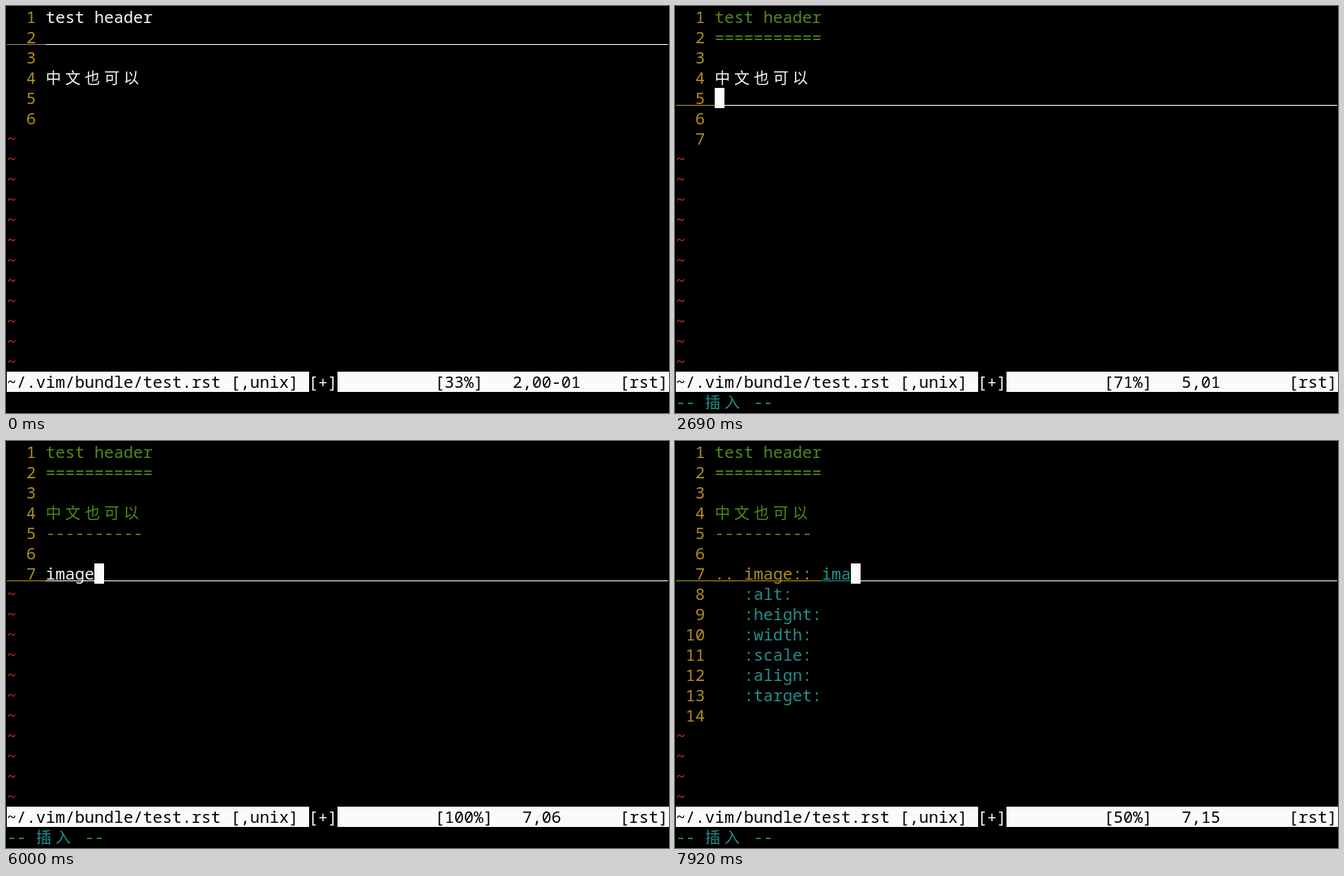
Write an HTML page that moves like this. It is 818 px wide and 502 px high and loops after 8000 ms.

```html
<!DOCTYPE html>
<html lang="zh">
<head>
<meta charset="utf-8">
<title>Editing test.rst</title>
<style>
  html, body { margin: 0; width: 100%; height: 100%; overflow: hidden; background: #000; }
  svg { display: block; }
  text { font: 20px "Noto Sans Mono", "DejaVu Sans Mono", monospace; white-space: pre; }
  .wide { font: 19px "Noto Sans CJK SC", "Noto Sans CJK", sans-serif; letter-spacing: 5px; }
</style>
</head>
<body>
<svg id="terminal" width="818" height="502" viewBox="0 0 818 502"></svg>
<script>
(() => {
  const LOOP = 8000, CELL = 12, ROW = 25, TEXT_COL = 4, ROWS = 18;
  const WHITE = '#fafafa', OCHRE = '#b18d1e', GREEN = '#4e8a1c', TEAL = '#23908e', RED = '#bd2c1e';
  const FIELDS = ['alt', 'height', 'width', 'scale', 'align', 'target'];
  const TITLE = 'test header', SUBTITLE = '中文也可以';
  const TRIGGER = 'image', DIRECTIVE = '.. image:: ', PATH = 'ima';
  const NEW_LINE = 2530;

  // Each step: time, cursor row, characters typed in that row, mode, extras.
  const steps = [];
  const step = (time, row, typed, mode = 'normal', extra = {}) =>
    steps.push({ time, row, typed, mode, ...extra });
  const type = (start, gap, count, row, base = 0, extra = {}) => {
    for (let i = 0; i < count; i++) step(start + i * gap, row, base + i + 1, 'insert', extra);
  };

  step(0, 2, 0, 'normal', { hidden: true });
  step(70, 2, 0);
  step(380, 2, 0, 'insert');
  type(840, 80, TITLE.length, 2);
  step(1760, 2, TITLE.length);
  step(1990, 3, 0);
  step(2220, 4, 0);
  step(NEW_LINE, 5, 0, 'insert');
  type(3610, 55, SUBTITLE.length * 2, 5);
  step(4610, 5, SUBTITLE.length * 2);
  step(4920, 6, 0);
  step(5150, 7, 0);
  step(5460, 7, 0, 'insert');
  type(5600, 80, TRIGGER.length, 7);
  step(6230, 7, DIRECTIVE.length, 'insert', { expanded: true });
  type(7460, 190, PATH.length, 7, DIRECTIVE.length, { expanded: true });

  const terminal = document.getElementById('terminal');
  const cellX = col => 1 + col * CELL;
  const rowY = row => 1 + (row - 1) * ROW;
  const isWide = text => /[\u4e00-\u9fff]/.test(text);
  const cells = text => isWide(text) ? text.length * 2 : text.length;
  const rect = (x, y, width, height, fill) =>
    `<rect x="${x}" y="${y}" width="${width}" height="${height}" fill="${fill}"/>`;
  const print = (row, col, text, fill) =>
    `<text x="${cellX(col)}" y="${rowY(row) + 20}" fill="${fill}"${isWide(text) ? ' class="wide"' : ''}>${text}</text>`;

  // Lines of the buffer, each a list of [text, colour] runs.
  function buffer({ time, row, typed, expanded }) {
    const heading = (text, mark, underlineRow) => {
      const count = row === underlineRow ? typed : row > underlineRow ? cells(text) : 0;
      const color = count > 1 ? GREEN : WHITE;
      return [[[text, color]], [[mark.repeat(count), color]]];
    };
    const lines = [...heading(TITLE, '=', 2), [], ...heading(SUBTITLE, '-', 5), []];
    if (expanded) {
      lines.push([[DIRECTIVE, OCHRE], [PATH.slice(0, typed - DIRECTIVE.length), TEAL]]);
      for (const field of FIELDS) lines.push([[`   :${field}:`, TEAL]]);
      lines.push([]);
    } else if (time >= NEW_LINE) {
      lines.push([[row === 7 ? TRIGGER.slice(0, typed) : '', WHITE]]);
    }
    return lines;
  }

  function statusBar({ row, typed, mode }, total, empty) {
    const bar = ROWS + 1;
    const pad = n => String(n).padStart(2, '0');
    const percent = `[${Math.floor(row * 100 / total)}%]`;
    const column = mode === 'insert' ? pad(typed + 1) : empty ? '00-01' : pad(Math.max(typed, 1));
    return rect(1, rowY(bar), 373, ROW, WHITE) + rect(409, rowY(bar), 409, ROW, WHITE)
      + print(bar, 0, '~/.vim/bundle/test.rst [,unix]', '#000')
      + print(bar, 31, '[+]', WHITE)
      + print(bar, 44, percent, '#000')
      + print(bar, 47 + percent.length, `${row},${column}`, '#000')
      + print(bar, 63, '[rst]', '#000');
  }

  function draw(state) {
    const { row, typed, mode, hidden } = state;
    const lines = buffer(state);
    let out = '';
    for (let r = 1; r <= ROWS; r++) {
      const line = lines[r - 1];
      if (!line) { out += print(r, 0, '~', RED); continue; }
      const lineY = rowY(r) + 21, current = r === row;
      if (current) out += rect(1, lineY, 816, 1, WHITE) + rect(1, lineY, 48, 1, hidden ? '#858078' : OCHRE);
      out += print(r, 0, String(r).padStart(4).slice(1), OCHRE);
      let col = TEXT_COL;
      for (const [text, color] of line) {
        if (current) out += rect(cellX(col), lineY, cells(text) * CELL, 1, color);
        out += print(r, col, text, color);
        col += cells(text);
      }
    }
    const text = lines[row - 1].map(run => run[0]).join('');
    if (!hidden) {
      const offset = mode === 'insert' ? typed : Math.max(typed - 1, 0);
      const under = text[offset] || ' ';
      out += rect(cellX(TEXT_COL + offset), rowY(row), cells(under) * CELL, ROW, WHITE)
        + print(row, TEXT_COL + offset, under, '#000');
    }
    out += statusBar(state, lines.length, !text);
    if (mode === 'insert') {
      const foot = ROWS + 2;
      out += print(foot, 0, '--', TEAL) + print(foot, 3, '插入', TEAL) + print(foot, 8, '--', TEAL);
    }
    terminal.innerHTML = out;
  }

  const start = performance.now();
  let shown;
  function tick(now) {
    const time = Math.max(0, now - start) % LOOP;
    const state = steps.findLast(s => s.time <= time);
    if (state !== shown) draw(shown = state);
    requestAnimationFrame(tick);
  }
  tick(start);
})();
</script>
</body>
</html>
```
